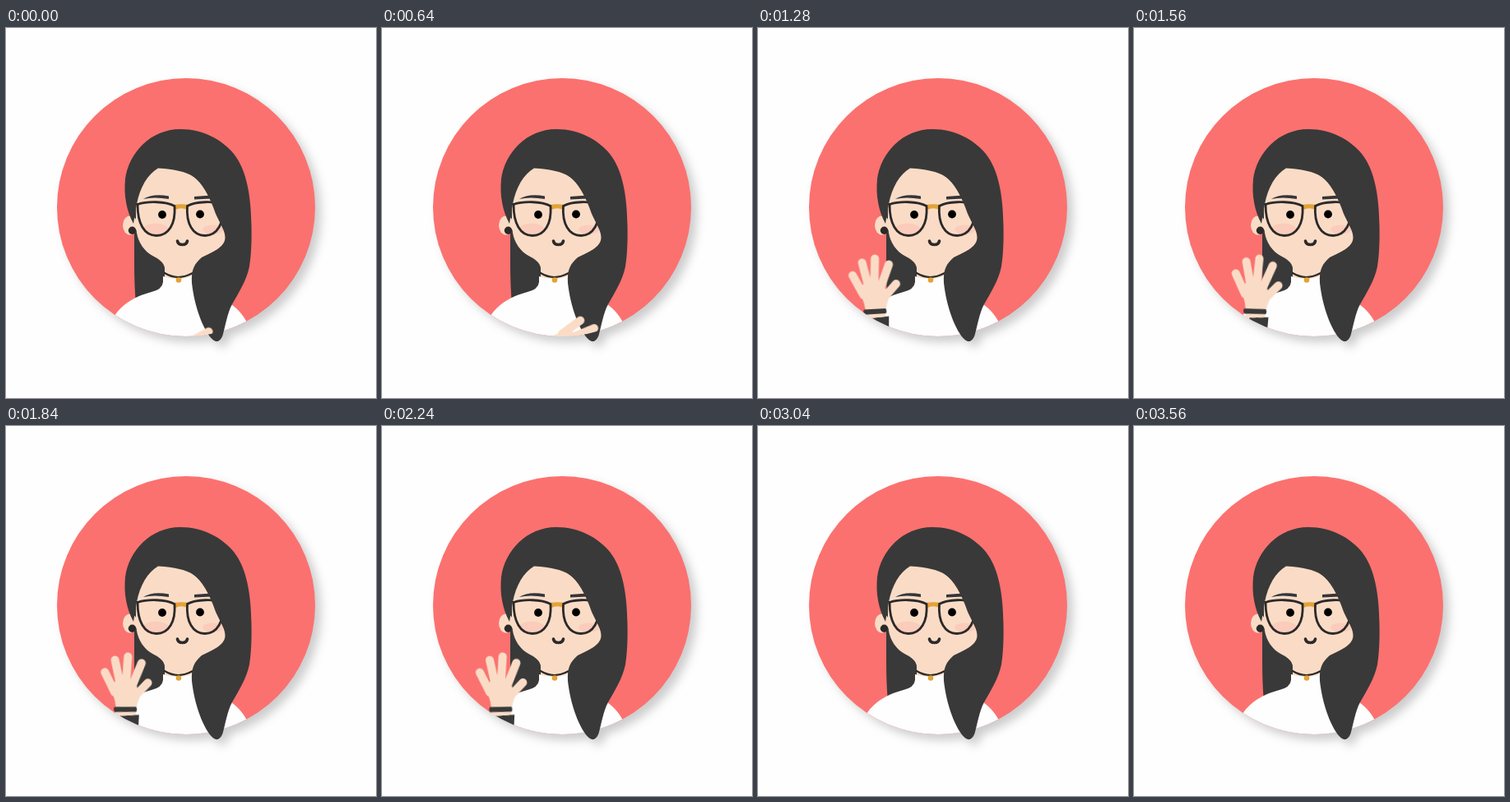
Recreate the animation shown at these times as an HTML page. Size 450 px wide and 450 px high, loop 4040 ms.

```html
<!DOCTYPE html>
<html lang="en">
<head>
<meta charset="utf-8">
<title>Waving avatar</title>
<style>
  html, body { margin: 0; width: 100%; height: 100%; overflow: hidden; background: #fefefe; }
  svg { display: block; width: 450px; height: 450px; }

  .shadow { filter: drop-shadow(7px 7px 6px rgba(40, 40, 45, .23)); }
  .hair { fill: #393939; }
  .skin { fill: #fadcc6; }
  .shirt { fill: #fefefe; }
  .gold { fill: #e3a336; }
  .blush { fill: #fbccbb; }
  .brow { fill: #35353b; }
  .line { fill: none; stroke: #2b2929; stroke-width: 2.8; stroke-linecap: round; stroke-linejoin: round; }
  .mouth { stroke-width: 3.7; }
  .choker { stroke-width: 2.2; }
  .fingers { fill: none; stroke: #fadcc6; stroke-width: 10; stroke-linecap: round; }

  .arm {
    transform-box: view-box;
    transform-origin: 147px 400px;
    animation: wave 4040ms infinite;
  }
  /* rise on the right, swing over, wave, drop out on the left */
  @keyframes wave {
    0%     { transform: rotate(91deg); animation-timing-function: cubic-bezier(.4, 0, .7, .6); }
    15.84% { transform: rotate(83deg); animation-timing-function: cubic-bezier(.45, .08, .4, 1); }
    30.69% { transform: rotate(0deg); animation-timing-function: ease-in-out; }
    37.13% { transform: rotate(6deg); animation-timing-function: ease-in-out; }
    42.57% { transform: rotate(1.5deg); animation-timing-function: ease-in-out; }
    48.51% { transform: rotate(5deg); animation-timing-function: ease-in-out; }
    55.45% { transform: rotate(2.5deg); animation-timing-function: ease-in-out; }
    77.23%, 100% { transform: rotate(-115deg); }
  }
</style>
</head>
<body>
<svg viewBox="0 0 450 450">
  <defs>
    <clipPath id="disc"><circle cx="219" cy="218" r="157"/></clipPath>
  </defs>

  <g class="shadow">
    <circle cx="219" cy="218" r="157" fill="#fb716f"/>

    <!-- back hair, ear, neck -->
    <path class="hair" d="M156 215V285Q156 315 158 335H200V285L215 230Z"/>
    <ellipse class="skin" cx="151" cy="240" rx="9" ry="11.5"/>
    <path class="skin" d="M184 270Q193 282 193 292V312H230V270Z"/>
    <g clip-path="url(#disc)">
      <path class="shirt" d="M128 357C138 337 155 327 177 321Q190 318 191 309V302Q209 309 228 301L232 320C262 325 283 338 293 358L302 400H120Z"/>
    </g>
    <path class="line choker" d="M193 298Q209 308 227 298"/>
    <circle class="gold" cx="210" cy="306.5" r="3.3"/>

    <!-- face -->
    <path class="skin" d="M158 195L183 168H245L270 235V256C264 267 247 275 237 282C231 287 229 290 227 296Q209 304 194 297C194 287 188 282 180 278C168 272 161 261 159 249L158 240Z"/>
    <ellipse class="blush" cx="182" cy="244" rx="15" ry="6.5"/>
    <ellipse class="blush" cx="252" cy="245" rx="13" ry="5.5"/>
    <path class="brow" d="M167 208Q178 201 198 204.500V208Q180 205 167 208ZM229 205L250 203.500V207.500L229 208.500Z"/>
    <path class="line mouth" d="M208.5 259C209.500 265 219.500 265 220.500 259"/>
    <circle cx="190" cy="227" r="4.900"/>
    <circle cx="236" cy="226.500" r="4.900"/>

    <!-- glasses -->
    <path class="gold" d="M204 215Q213 213.500 222 215L220 221Q213 217.500 206 221Z"/>
    <path class="line" d="M156 213.500L160 214.500C172 210.500 194 210.500 205 216.500C206.500 238 198 252.500 183 252.500C168 252.500 160 238 160 214.500"/>
    <path class="line" d="M220.500 216.500C231 210.500 253 210.500 265 214.500C265 238 257 252.500 242 252.500C227 252.500 219 238 220.500 216.500"/>

    <!-- front hair -->
    <path class="hair" d="M155 238C147 223 143 205 145 184C149 152 176 123 212 123C240 123 263 136 277 153C293 173 298 205 298.500 240C299 262 298 278 296 290C293 306 283 322 275 336C269 347 267 362 263.500 374Q259 385 252 379.500C240 369 229 338 226 310C225 294 229 287 238 279C252 272 266 267 266.500 255C266.500 247 262 241 255 226C247 203 238 188 228 181Q215 172 185 170.500C172 178 163 194 159 214Z"/>
    <circle cx="153.500" cy="246.300" r="4.700" fill="#2b2929"/>
  </g>

  <g clip-path="url(#disc)">
    <g class="arm">
      <path class="hair" d="M136 353L159 350.500V400H136Z"/>
      <path class="skin" d="M123 323L129 308H152L157 325L161 324Q155 334 155 351L131 353.500Q131 334 123 323Z"/>
      <path class="fingers" d="M114.500 301L128 325M126 285.500L134 315M141.500 280.500L141 315M158.500 287.500L148 318M167.500 311L152 329"/>
      <path class="hair" d="M129 342.500L155 341Q157 344 155.500 347L129.500 348.800Q126.500 345.500 129 342.500Z"/>
    </g>
  </g>
</svg>
</body>
</html>
```
